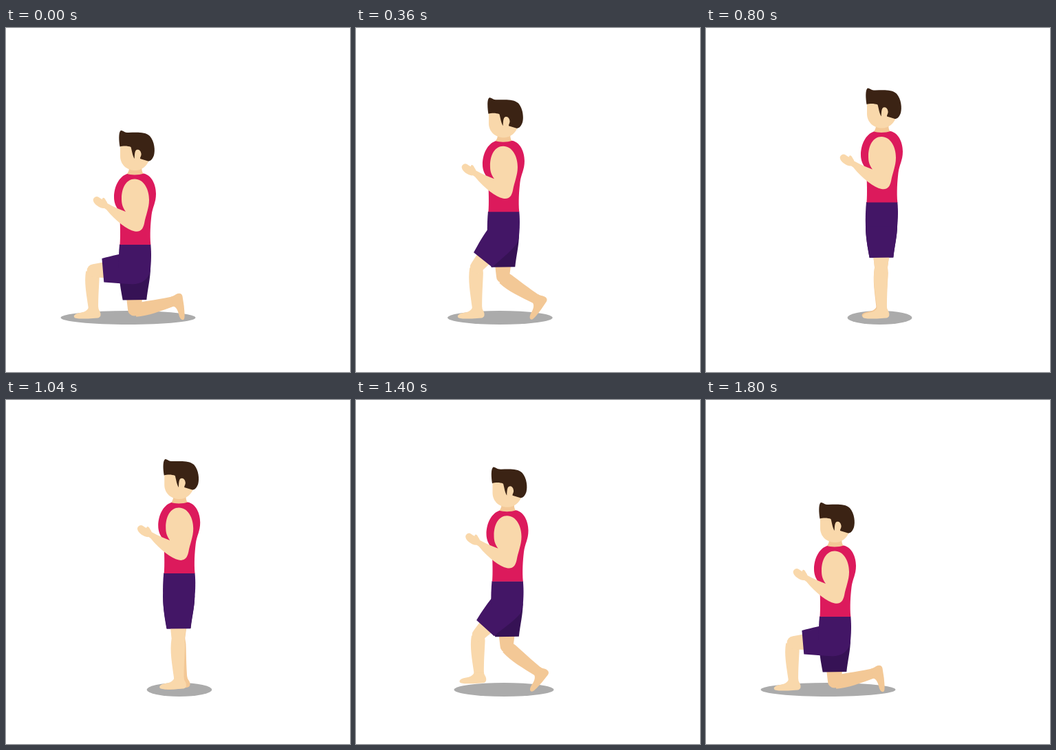
Animation of 500x500 px, one loop 2.4 s. Source, as an HTML page:

```html
<!DOCTYPE html>
<html lang="en">
<head>
<meta charset="utf-8">
<title>Lunge</title>
<style>
  html, body { margin: 0; width: 100%; height: 100%; overflow: hidden; background: #fff; }
  svg { display: block; width: 100%; height: 100%; }
  .skin { fill: #f9d8ab; }
  .shade { fill: #f3c896; }
  .shorts { fill: #431666; }
  .dark { fill: #361255; }
  .shirt { fill: #dc1a5c; }
  .hair { fill: #3b2314; }
</style>
</head>
<body>
<svg viewBox="0 0 500 500">
  <defs>
    <path id="shin" d="M-10 0C-13 18 -10 35 -7 61H7C7 40 9 20 9.500 8L9 0Z"/>
    <path id="foot" d="M-7 -3C-8 2 -13 4.500 -20 5.500C-27 6.500 -30 10 -27.500 12.500C-25 14.500 -14 14 -8 14L6 13C10 12.500 11.500 9 9.500 4C8 1 7 0 7 -3Z"/>
    <path id="stub" d="M-12.500 38H12L9 60A9.500 9.500 0 0 1 -10 60Z"/>
    <path id="thigh" d="M-23 0A23 23 0 0 1 23 0C23 14 19 30 17.300 46L-17.300 46.500C-20 32 -23 16 -23 0Z"/>
  </defs>

  <ellipse id="shadow" cy="421" ry="10" fill="#ababab"/>

  <g id="backShin" class="shade">
    <use href="#shin"/>
    <use id="backFoot" href="#foot"/>
  </g>
  <g id="backThigh">
    <use href="#stub" class="shade"/>
    <use href="#thigh" class="dark"/>
  </g>

  <use id="frontShin" href="#shin" class="skin"/>
  <use id="frontFoot" href="#foot" class="skin"/>
  <g id="frontThigh">
    <use href="#stub" class="skin"/>
    <use href="#thigh" class="shorts"/>
  </g>

  <g id="body">
    <path class="shorts" d="M165 314.500H210.300C211.500 327 211 340 210 350H164C163.500 338 164 325 165 314.500Z"/>
    <path class="shade" d="M179 203C179 208 177 211 174 214H202C198 211 197 207 197.500 202Z"/>
    <path class="shirt" d="M176 212C181 214 194 214 200 211.500C212 214 218 228 218 241C218 254 213 260 211.500 272C210 285 209 300 210.300 315H165.500C166.500 303 166 285 165 266C160 261 157 254 157 246C157 231 164 216 176 212Z"/>
    <path class="skin" d="M187 219.500C200 219.500 208 234 208 250C208 262 203 272 201 284C199 293 195 297 187 295.500C176 293 160 281 146 264L143 262C137 263 128 256 127 251.500C125.500 247 131 243.500 134 245.500C137 247.500 138 248.500 140 249C140 246 143 246 144.500 249.500C146 252 147 253 147.500 255C156 260 166 264 174 267C169 260 168 255 168 248C168 232 175 219.500 187 219.500Z"/>
    <path class="skin" d="M166 165V186C166 199 176 207 188 207C198 207 205 200 208 192V165Z"/>
    <path class="hair" d="M165.500 172.500C164 164 163.500 152 166.500 149.300C169 147.500 171 152 178 152C190 152 202 150.500 209 157C216 165 217 178 215 185C213 191 210 193.500 206.500 193.500L195 190C195 187 197 186 196.500 182.500C196 178.500 193.500 176.500 191 176.700C187.500 177 187 181 186.700 190C184 186 183 178 181.500 173C177 171 170 171 165.500 172.500Z"/>
  </g>
</svg>
<script>
  const LOOP = 2400, STEP = 40, MOVE = 800, DOWN = 1000;
  const THIGH = 61, SHIN = 60, BACK_SHIN = 58.5, DEG = Math.PI / 180;
  const $ = id => document.getElementById(id);
  const smooth = x => x * x * (3 - 2 * x);
  const place = (id, value) => $(id).setAttribute('transform', value);

  // u is 0 in the lunge and 1 when standing
  function pose(u, rising) {
    const s = smooth(u);
    const dx = u * (64 + 4 * u * u) - (rising ? 9 * u * (1 - u) : 0);
    const dy = -u * (131 - 44 * u - 25.5 * u * u);
    const hipX = 187 + dx, hipY = 349 + dy;

    $('shadow').setAttribute('cx', 177.5 + 75 * s);
    $('shadow').setAttribute('rx', 98 - 51 * s);
    place('body', `translate(${dx} ${dy})`);

    const bend = 103 * (1 - u);
    place('backThigh', `translate(${hipX} ${hipY})`);
    place('backShin', `translate(${hipX} ${hipY + THIGH}) rotate(${-bend})`);
    place('backFoot', `translate(0 ${BACK_SHIN}) rotate(${bend * 0.08})`);

    const lift = 86 * (1 - (rising ? smooth(u ** 0.8) : s));
    const kneeX = hipX - THIGH * Math.sin(lift * DEG);
    const kneeY = hipY + THIGH * Math.cos(lift * DEG);
    const raise = rising ? 0 : 4 * Math.sin(Math.PI * u);
    const footX = kneeX + 1;
    const footY = Math.min(408.5, kneeY + SHIN - raise);
    const length = Math.hypot(footX - kneeX, footY - kneeY);
    const tilt = Math.atan2(kneeX - footX, footY - kneeY) / DEG;
    place('frontThigh', `translate(${hipX} ${hipY}) rotate(${lift})`);
    place('frontShin', `translate(${kneeX} ${kneeY}) rotate(${tilt}) scale(1 ${length / SHIN})`);
    place('frontFoot', `translate(${footX} ${footY})`);
  }

  function draw() {
    const t = Math.floor(performance.now() % LOOP / STEP) * STEP;
    const rising = t < DOWN;
    pose(rising ? Math.min(1, t / MOVE) : Math.max(0, 1 - (t - DOWN) / MOVE), rising);
    requestAnimationFrame(draw);
  }
  draw();
</script>
</body>
</html>
```
